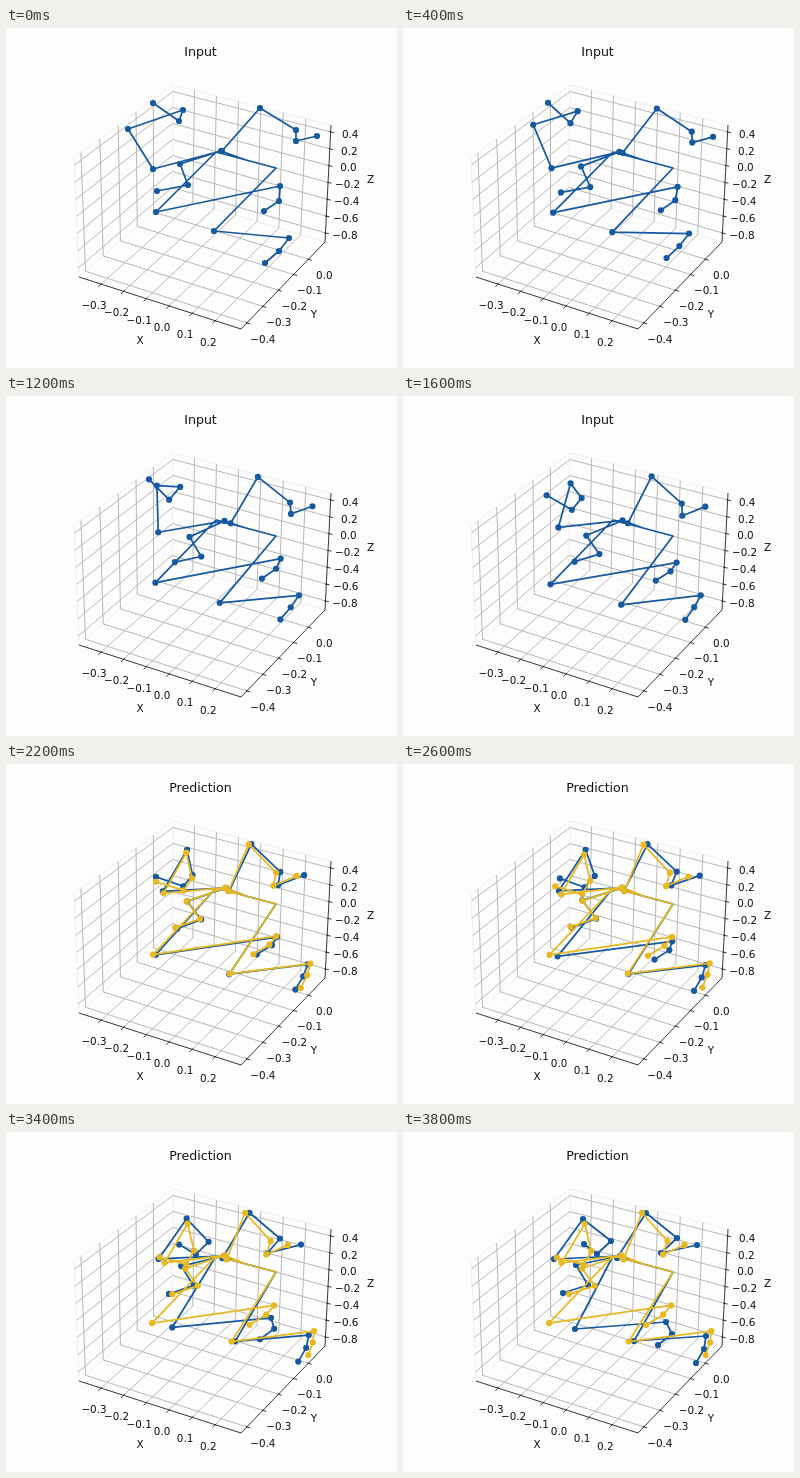
These frames come from a looping animation (391x340 px, 4000 ms). An HTML page:

```html
<!DOCTYPE html>
<html lang="en">
<head>
<meta charset="utf-8">
<title>Pose plot</title>
<style>
  html, body { margin: 0; width: 100%; height: 100%; overflow: hidden; background: #fdfdfd; }
  svg { display: block; width: 391px; height: 340px; }
  text { font: 10.4px "DejaVu Sans", sans-serif; text-anchor: middle; fill: #111; }
  #title { font-size: 12.6px; }
  path { fill: none; stroke-linejoin: round; }
</style>
</head>
<body>
<svg viewBox="0 0 391 340">
  <g id="axes"></g>
  <g id="bodies"></g>
  <text id="title" x="194.5" y="27.6">Input</text>
</svg>
<script>
const LOOP = 4000, STEP = 200, SWITCH = 2000;

function add(parent, tag, attrs, text) {
  const node = document.createElementNS('http://www.w3.org/2000/svg', tag);
  for (const key in attrs) node.setAttribute(key, attrs[key]);
  if (text) node.textContent = text;
  return parent.appendChild(node);
}
const byId = id => document.getElementById(id);
const mix = (a, b, k) => [a[0] + (b[0] - a[0]) * k, a[1] + (b[1] - a[1]) * k];
const polyline = points => 'M' + points.map(p => p[0].toFixed(2) + ' ' + p[1].toFixed(2)).join('L');

// Corners of the three visible panes
const left = [73, 249], front = [235, 301], right = [319, 214], back = [166, 168];
const leftTop = [68, 130], backTop = [167, 57], rightTop = [325, 97];

function drawAxes() {
  const axes = byId('axes');
  const stroke = (color, width, ...points) =>
    add(axes, 'path', { d: polyline(points), stroke: color, 'stroke-width': width });
  const grid = (...points) => stroke('#b8b8b8', 1, ...points);
  const edge = (...points) => stroke('#222', 0.9, ...points);
  const pane = (...points) => stroke('#eeeeee', 0.9, ...points);
  const text = (x, y, value) => add(axes, 'text', { x, y }, value);

  pane(left, leftTop, backTop, rightTop);
  pane(left, back, right);
  pane(back, backTop);

  const marks = [];
  for (let i = 0; i < 6; i++) {
    const k = 0.136 + 0.1385 * i + 0.0005 * i * i, p = mix(left, front, k);
    grid(p, mix(back, right, k), mix(backTop, rightTop, k));
    marks.push({ p, tick: [-2.6, 2.8], label: [-7, 25], value: (i - 3) / 10 });
  }
  for (let i = 0; i < 5; i++) {
    const k = 0.07 + 0.193 * i - 0.0025 * i * i, p = mix(front, right, k);
    grid(p, mix(left, back, k), mix(leftTop, backTop, k));
    marks.push({ p, tick: [3.4, 1.1], label: [16, 19.6], value: (i - 4) / 10 });
  }
  for (let i = 0; i < 7; i++) {
    const k = 0.077 + 0.144 * i, p = mix(right, rightTop, k);
    grid(mix(left, leftTop, k), mix(back, backTop, k), p);
    marks.push({ p, tick: [3.4, 0.8], label: [19.5, 5.8], value: (i - 4) / 5 });
  }
  edge(left, front, right, rightTop);
  for (const { p: [x, y], tick: [dx, dy], label, value } of marks) {
    edge([x - dx / 3, y - dy / 3], [x + dx, y + dy]);
    text(x + label[0], y + label[1], value.toFixed(1).replace('-', '\u2212'));
  }
  text(134, 315.5, 'X');
  text(308, 290, 'Y');
  text(364.5, 155, 'Z');
}

// Smooth curve through one value per key time
const keyTimes = [0, 1000, 2000, 3800];
function sample(values, t) {
  const last = keyTimes.length - 1;
  const slope = i => {
    const a = Math.max(i - 1, 0), b = Math.min(i + 1, last);
    return (values[b] - values[a]) / (keyTimes[b] - keyTimes[a]);
  };
  const i = Math.max(keyTimes.findLastIndex((time, n) => n < last && time <= t), 0);
  const span = keyTimes[i + 1] - keyTimes[i], u = (t - keyTimes[i]) / span, v = 1 - u;
  return v * v * ((1 + 2 * u) * values[i] + u * span * slope(i)) +
         u * u * ((3 - 2 * u) * values[i + 1] - v * span * slope(i + 1));
}

// Each pose lists the x, y pairs of a limb's joints; drift is how far its tip is mispredicted
function limb(drift, ...poses) {
  const count = poses[0].length / 2;
  const at = t => Array.from({ length: count }, (_, j) =>
    [0, 1].map(axis => sample(poses.map(pose => pose[2 * j + axis]), t)));
  const predicted = t => {
    const settle = 1 - Math.exp((SWITCH - 100 - t) / 500);
    return at(SWITCH).map(([x, y], j) => {
      const k = settle * (j + 1) / count;
      return [x + drift[0] * k, y + drift[1] * k];
    });
  };
  return { at, predicted };
}

const nearLeg = limb([15, -2],
  [208, 203, 283, 210, 273, 223, 259, 235],
  [212, 206, 291, 200, 282, 212, 271, 224],
  [222, 210, 301, 200, 296, 212, 288, 225],
  [231, 209, 303, 204, 301, 217, 293, 231]);
const farLeg = limb([-8, 5],
  [150, 184, 274, 158, 273, 173, 258, 183],
  [150, 186, 275, 161, 271, 172, 257, 182],
  [148, 190, 272, 171, 266, 179, 251, 188],
  [172, 197, 263, 190, 269, 202, 255, 213]);
const spine = limb([-6, -3],
  [215, 123, 174, 136, 182, 157, 151, 163],
  [218, 125, 183, 141, 194, 161, 167, 166],
  [220, 124, 182, 138, 196, 156, 172, 165],
  [217, 124, 173, 133, 185, 153, 160, 161]);
const leftArm = limb([7, 15],
  [147, 141, 122, 101, 177, 82, 173, 93, 147, 75],
  [151, 138, 144, 91, 173, 87, 162, 100, 143, 78],
  [157, 128, 179, 86, 184, 110, 175, 121, 147, 111],
  [151, 127, 180, 87, 208, 109, 194, 122, 181, 112]);
const rightArm = limb([-18, 2],
  [216, 123, 254, 80, 290, 102, 290, 113, 311, 108],
  [224, 127, 253, 81, 286, 106, 287, 117, 308, 110],
  [224, 127, 246, 80, 275, 108, 274, 121, 299, 111],
  [214, 126, 243, 81, 274, 106, 258, 121, 294, 113]);

const limbs = [nearLeg, farLeg, spine, leftArm, rightArm];
const nearHip = [270, 140], farHip = [210, 124], pelvis = mix(nearHip, farHip, 0.5);

function createBody(color) {
  const group = add(byId('bodies'), 'g', {});
  const bones = add(group, 'path', { stroke: color, 'stroke-width': 1.75 });
  const dots = Array.from({ length: 22 }, () => add(group, 'circle', { r: 3.1, fill: color }));
  return { group, bones, dots };
}

function poseBody(body, joints) {
  const [near, far, trunk, armL, armR] = joints;
  const chains = [
    [farHip, nearHip, ...near], [farHip, ...far], [pelvis, ...trunk],
    [trunk[0], ...armL], [trunk[0], ...armR]
  ];
  body.bones.setAttribute('d', chains.map(polyline).join(''));
  joints.flat().forEach(([x, y], i) => {
    body.dots[i].setAttribute('cx', x.toFixed(2));
    body.dots[i].setAttribute('cy', y.toFixed(2));
  });
}

const actual = createBody('#17599f');
const guess = createBody('#e7b820');

function render(now) {
  const t = Math.floor((now % LOOP) / STEP) * STEP;
  const predicting = t >= SWITCH;
  byId('title').textContent = predicting ? 'Prediction' : 'Input';
  guess.group.style.display = predicting ? '' : 'none';
  poseBody(actual, limbs.map(part => part.at(t)));
  if (predicting) poseBody(guess, limbs.map(part => part.predicted(t)));
}

drawAxes();
const start = performance.now();
function loop() {
  render(performance.now() - start);
  requestAnimationFrame(loop);
}
loop();
</script>
</body>
</html>
```
